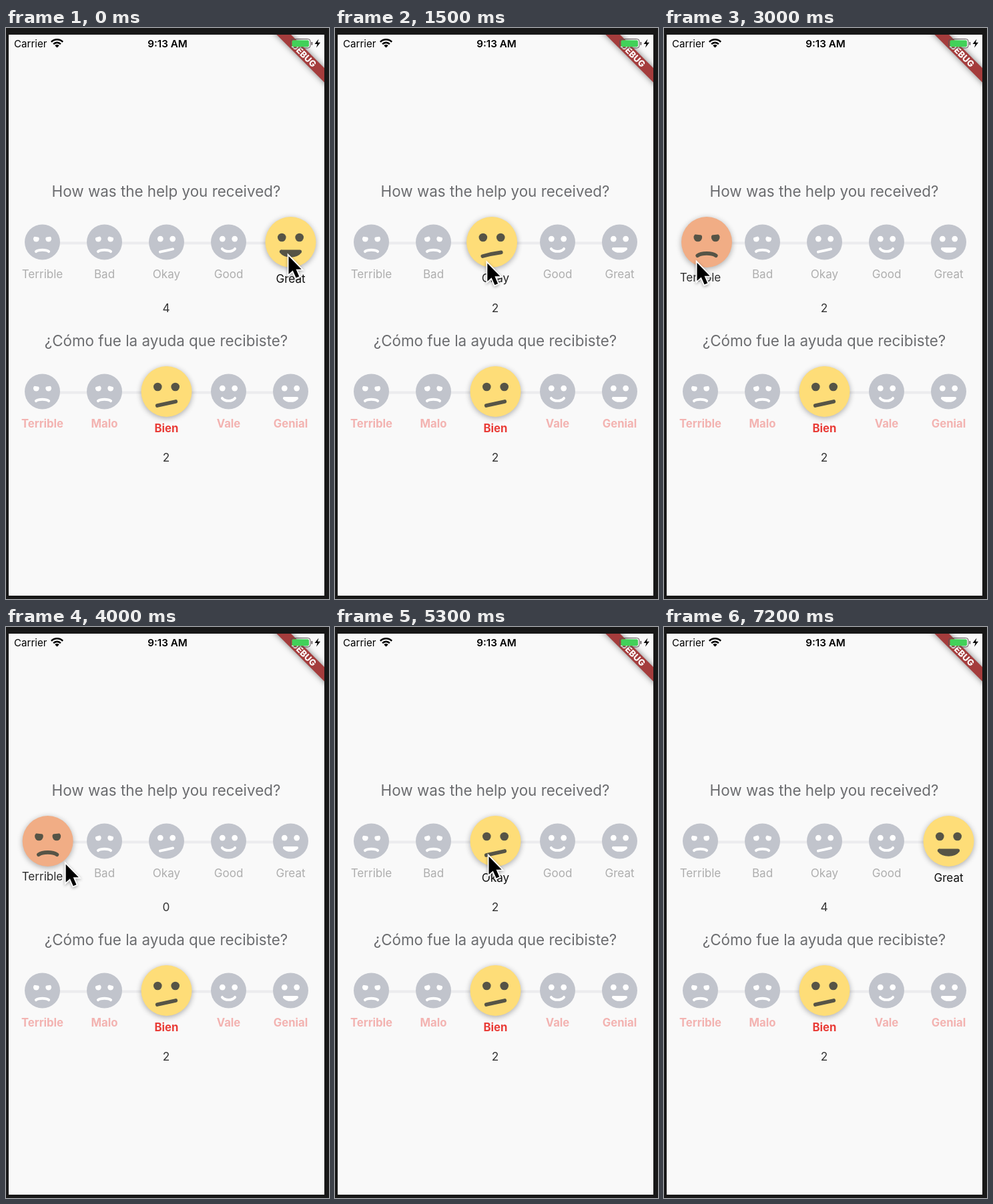
Write an HTML page with a canvas that moves like this. It is 484 px wide and 856 px high and loops after 7400 ms.

```html
<!DOCTYPE html>
<html lang="en">
<head>
<meta charset="utf-8">
<title>Review sliders</title>
<style>
  html, body { margin: 0; width: 100%; height: 100%; overflow: hidden; background: #181818; }
  canvas { display: block; width: 484px; height: 856px; }
</style>
</head>
<body>
<canvas id="stage" width="484" height="856"></canvas>
<script>
const ctx = document.getElementById('stage').getContext('2d');
const LOOP = 7400, STEP = 100;
const HOLD = 450, SETTLE = 250, TRAVEL = 420;
const SCREEN = { x: 4, y: 10, w: 473, h: 841 };
const FIRST = 54.5, GAP = 93;
const HEAD_R = 38, SMALL_R = 26.5;
const FONT = 'Inter, Roboto, sans-serif';

// Each drag carries the pointer from grab to drop; the head follows to `head`, then snaps to a stop
const DRAGS = [
  { start: 0, end: 900, grab: [422, 340], drop: [228, 353], head: 225 },
  { start: 2200, end: 2900, grab: [224, 345], drop: [48, 350], head: 64 },
  { start: 3940, end: 4400, grab: [80, 354], drop: [255, 347], head: 229 },
  { start: 5300, end: 6220, grab: [229, 342], drop: [449, 346], head: 426.5 }
];
const EXIT = [500, 340];

const ROWS = [
  { y: 321, title: 'How was the help you received?', labels: ['Terrible', 'Bad', 'Okay', 'Good', 'Great'],
    font: `17.1px ${FONT}`, rgb: '0,0,0', dim: 0.3 },
  { y: 545, title: '¿Cómo fue la ayuda que recibiste?', labels: ['Terrible', 'Malo', 'Bien', 'Vale', 'Genial'],
    font: `bold 16.7px ${FONT}`, rgb: '232,48,42', dim: 0.35 }
];

const mix = (a, b, u) => a + (b - a) * u;
const mixPoint = (a, b, u) => a.map((v, i) => mix(v, b[i], u));
const clamp = (v, lo, hi) => Math.min(hi, Math.max(lo, v));
const stopX = i => FIRST + GAP * i;
const stopAt = x => clamp((x - FIRST) / GAP, 0, 4);

function ease(t, start, end) {
  const u = clamp((t - start) / (end - start), 0, 1);
  return u * u * (3 - 2 * u);
}

function poseAt(t) {
  let count = 4, head, cursor;
  DRAGS.forEach((drag, i) => {
    if (t < drag.start) return;
    const u = ease(t, drag.start, drag.end);
    head = mix(stopX(count), drag.head, u);
    cursor = mixPoint(drag.grab, drag.drop, u);
    const release = drag.end + HOLD;
    if (t < release) return;
    count = Math.round(stopAt(drag.head));
    head = mix(drag.head, stopX(count), ease(t, release, release + SETTLE));
    const next = i + 1 < DRAGS.length ? DRAGS[i + 1].grab : EXIT;
    cursor = mixPoint(drag.drop, next, ease(t, release, release + TRAVEL));
  });
  return { count, head, cursor };
}

function text(str, x, y, font, color, align = 'center') {
  ctx.font = font;
  ctx.fillStyle = color;
  ctx.textAlign = align;
  ctx.fillText(str, x, y);
}

function disc(x, y, r, color) {
  ctx.fillStyle = color;
  ctx.beginPath();
  ctx.arc(x, y, r, 0, Math.PI * 2);
  ctx.fill();
}

function shadow(color, blur, dy) {
  ctx.shadowColor = color;
  ctx.shadowBlur = blur;
  ctx.shadowOffsetY = dy;
}

function polygon(points) {
  ctx.beginPath();
  points.forEach(([x, y]) => ctx.lineTo(x, y));
  ctx.closePath();
}

function eye(side, lid, slope, color) {
  ctx.save();
  ctx.translate(side * 13.2, -7);
  ctx.scale(-side, 1); // positive x points to the nose
  polygon([[-8, lid - 8 * slope], [8, lid + 8 * slope], [8, 8], [-8, 8]]);
  ctx.clip();
  disc(0, 0, 6.3, color);
  ctx.restore();
}

function mouth(value, color) {
  const bend = clamp((value - 2) * 7.5, -4.5, 7.5);
  const tilt = -0.22 * Math.max(0, 1 - Math.abs(value - 2));
  const corner = 18 - bend / 2;
  const bottom = corner + bend;
  const top = mix(bottom, corner, Math.max(0, value - 3));
  const at = (x, y) => [x, y + tilt * x];
  ctx.fillStyle = ctx.strokeStyle = color;
  ctx.lineWidth = 5.6;
  ctx.lineCap = ctx.lineJoin = 'round';
  ctx.beginPath();
  ctx.moveTo(...at(-13.8, corner));
  ctx.bezierCurveTo(...at(-8, top), ...at(8, top), ...at(13.8, corner));
  ctx.bezierCurveTo(...at(8, bottom), ...at(-8, bottom), ...at(-13.8, corner));
  ctx.fill();
  ctx.stroke();
}

function face(x, y, r, value, skin, ink, raised) {
  const gloom = clamp(2 - value, 0, 1);
  const lid = mix(-7, -4.2, gloom);
  const slope = gloom * mix(0.15, -0.3, Math.min(value, 1));
  ctx.save();
  if (raised) shadow('rgba(0,0,0,0.32)', 8, 2);
  disc(x, y, r, skin);
  shadow('transparent', 0, 0);
  ctx.translate(x, y);
  ctx.scale(r / HEAD_R, r / HEAD_R);
  eye(-1, lid, slope, ink);
  eye(1, lid, slope, ink);
  mouth(value, ink);
  ctx.restore();
}

function headColor(value) {
  const u = Math.min(value, 1);
  return `rgb(${mix(240, 254, u)},${mix(168, 221, u)},${mix(134, 120, u)})`;
}

function row({ y, title, labels, font, rgb, dim }, headX, count) {
  const value = stopAt(headX);
  text(title, 240, y - 68, `22.4px ${FONT}`, '#6b6c6f');
  ctx.fillStyle = '#ececee';
  ctx.fillRect(FIRST, y - 0.5, GAP * 4, 4);
  labels.forEach((label, i) => {
    const near = Math.max(0, 1 - Math.abs(value - i) * 2);
    if (near < 1) face(stopX(i), y, SMALL_R * (1 - near), i, '#c1c4cc', '#fff');
    text(label, stopX(i), y + 54 + 6.5 * near, font, `rgba(${rgb},${mix(dim, 0.94, near)})`);
  });
  face(headX, y, HEAD_R, value, headColor(value), '#565446', true);
  text(count, 240, y + 104.5, `17.3px ${FONT}`, '#333');
}

function wifi() {
  ctx.save();
  ctx.translate(76.5, 29.5);
  polygon([[0, 0], [-14, -14], [14, -14]]);
  ctx.clip();
  disc(0, 0, 4.5, '#000');
  ctx.strokeStyle = '#000';
  ctx.lineWidth = 2.6;
  for (const r of [7.6, 12.2]) {
    ctx.beginPath();
    ctx.arc(0, 0, r, Math.PI, Math.PI * 2);
    ctx.stroke();
  }
  ctx.restore();
}

function banner() {
  ctx.save();
  ctx.translate(SCREEN.x + SCREEN.w, SCREEN.y);
  ctx.rotate(Math.PI / 4);
  shadow('rgba(0,0,0,0.5)', 10, 0);
  ctx.fillStyle = '#a43c3c';
  ctx.fillRect(-70, 35.3, 140, 15.2);
  shadow('transparent', 0, 0);
  text('DEBUG', 0, 47.6, `800 13px ${FONT}`, '#fff');
  ctx.restore();
}

function battery() {
  ctx.strokeStyle = '#5c5355';
  ctx.lineWidth = 1;
  ctx.beginPath();
  ctx.roundRect(426.5, 16.5, 29.5, 13.5, 3.5);
  ctx.stroke();
  ctx.fillStyle = '#42d159';
  ctx.beginPath();
  ctx.roundRect(428.5, 18.3, 25.5, 10, 2);
  ctx.fill();
  ctx.fillStyle = '#5c5355';
  ctx.fillRect(457.5, 21, 1.7, 4.5);
  ctx.fillStyle = '#000';
  polygon([[468.5, 16.5], [462.5, 24], [466.5, 24], [465, 29.5], [471, 21.8], [467, 21.8]]);
  ctx.fill();
}

function pointer([x, y]) {
  ctx.save();
  ctx.translate(x + 1.5, y + 2);
  ctx.scale(1.13, 1.13);
  polygon([[0, 0], [0, 24], [5.5, 19], [9.8, 28.8], [14, 27], [9.8, 17.4], [17, 17.4]]);
  ctx.lineJoin = 'miter';
  ctx.lineWidth = 3.2;
  ctx.strokeStyle = '#fff';
  shadow('rgba(0,0,0,0.35)', 4, 1.5);
  ctx.stroke();
  shadow('transparent', 0, 0);
  ctx.fillStyle = '#000';
  ctx.fill();
  ctx.restore();
}

function draw(t) {
  const { count, head, cursor } = poseAt(t);
  ctx.fillStyle = '#181818';
  ctx.fillRect(0, 0, 484, 856);
  ctx.save();
  ctx.beginPath();
  ctx.rect(SCREEN.x, SCREEN.y, SCREEN.w, SCREEN.h);
  ctx.clip();
  ctx.fillStyle = '#f9f9f9';
  ctx.fillRect(SCREEN.x, SCREEN.y, SCREEN.w, SCREEN.h);
  row(ROWS[0], head, count);
  row(ROWS[1], stopX(2), 2);
  banner();
  text('Carrier', 12, 28.5, `15.1px ${FONT}`, '#000', 'left');
  wifi();
  text('9:13 AM', 242, 28.5, `600 15.2px ${FONT}`, '#000');
  battery();
  ctx.restore();
  pointer(cursor);
}

function tick() {
  const t = performance.now() % LOOP;
  draw(Math.floor(t / STEP) * STEP);
  requestAnimationFrame(tick);
}
tick();
</script>
</body>
</html>
```
